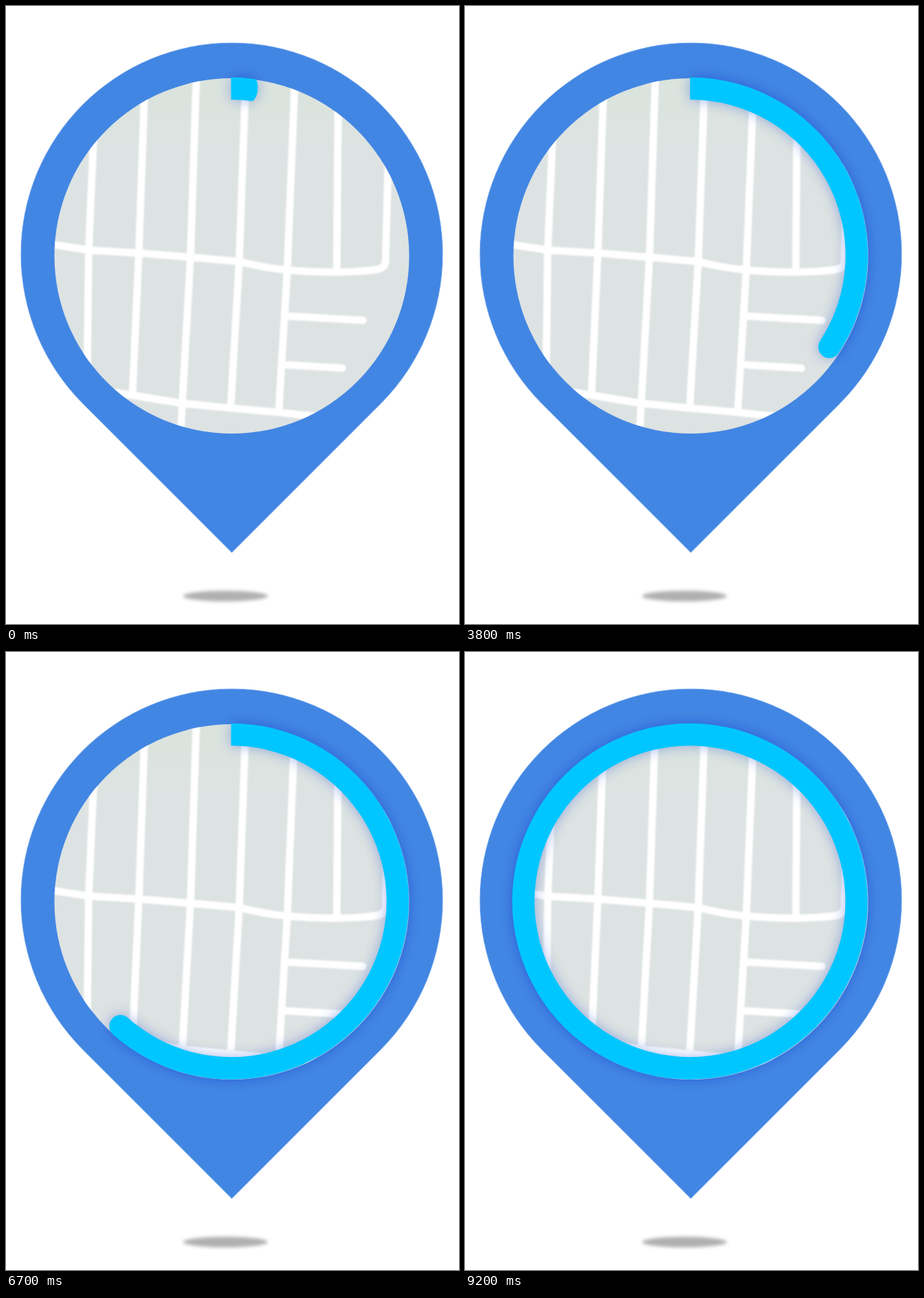
Recreate the animation shown at these times as an HTML page. Size 641 by 873 pixels, loop 9.3 s.

```html
<!DOCTYPE html>
<html lang="en">
<head>
<meta charset="utf-8">
<title>Map pin progress</title>
<style>
  html, body { margin: 0; width: 100%; height: 100%; overflow: hidden; background: #fff; }
  svg { display: block; }
  .roads { fill: none; stroke: #fff; stroke-width: 10.5; stroke-linecap: round; stroke-linejoin: round; filter: blur(.9px); }
  .glow { fill: #2450d0; filter: blur(9px); }
</style>
</head>
<body>
<svg width="641" height="873" viewBox="0 0 641 873">
  <defs>
    <clipPath id="disc"><circle cx="319.5" cy="353" r="251"/></clipPath>
    <linearGradient id="land" x2="0" y2="1">
      <stop offset="0" stop-color="#dae3dd"/>
      <stop offset=".2" stop-color="#dde3e2"/>
      <stop offset="1" stop-color="#dde2e2"/>
    </linearGradient>
    <path id="arc"/>
  </defs>

  <ellipse cx="310.5" cy="833.5" rx="60" ry="7.5" fill="#b0b0b0" style="filter:blur(2.5px)"/>
  <path d="M319.5 772 L108.6 561.4 A298.3 298.3 0 1 1 530.4 561.4 Z" fill="#4286e3" stroke="#6fa3ec" stroke-width=".8"/>
  <use href="#arc" class="glow" opacity=".75"/>

  <g clip-path="url(#disc)">
    <rect x="68" y="101" width="503" height="504" fill="url(#land)"/>
    <g class="roads">
      <path d="M124 185 L117 345 L115 510"/>
      <path d="M196 120 L188 348 L179 548"/>
      <path d="M269.500 95 L261 355 L247 605"/>
      <path d="M339.500 95 L330 361 L318 566"/>
      <path d="M408.500 110 L398 373 L386 572"/>
      <path d="M470 140 L468 374"/>
      <path d="M60 336 L118 345 L188 349 L262 355 L330 361 Q365 370 398 373 T468 376 Q510 375 526 372 Q537 369 537 361 L541 215"/>
      <path d="M398 438 L505 444 M398 507 L476 511.500"/>
      <path d="M155 546 L180 550 L247 561 L318 568 L386 574 L450 581"/>
    </g>
    <use href="#arc" class="glow" opacity=".42"/>
  </g>
  <use href="#arc" fill="#00c6ff"/>
</svg>
<script>
  const LOOP = 9300, STEP = 100;
  const CX = 318.5, CY = 352.25, OUTER = 251.5, INNER = 220;
  const HALF = (OUTER - INNER) / 2;

  // time in ms, sweep in degrees, depth of the leading cap
  const keys = [
    [0, 7.5, 7], [500, 28, 15], [600, 28, 15], [1400, 54.2, HALF], [1600, 61, HALF],
    [2400, 82.7, 6.5], [2600, 91, HALF], [3600, 121, HALF], [3800, 123.3, HALF],
    [4600, 151.3, HALF], [5600, 183, 7], [6600, 218.7, HALF], [7600, 248, HALF],
    [7800, 253.6, HALF], [8600, 289, HALF], [9200, 359.9, HALF]
  ];
  const arc = document.getElementById('arc');

  function poseAt(t) {
    const n = Math.max(1, keys.findIndex(k => k[0] >= t));
    const a = keys[n - 1], b = keys[n];
    const u = (t - a[0]) / (b[0] - a[0]);
    return [1, 2].map(i => a[i] + (b[i] - a[i]) * u);
  }

  function point(radius, deg) {
    const a = deg * Math.PI / 180;
    return (CX + radius * Math.sin(a)).toFixed(2) + ' ' + (CY - radius * Math.cos(a)).toFixed(2);
  }

  function draw(now) {
    const t = Math.floor(now % LOOP / STEP) * STEP;
    const [deg, cap] = poseAt(t);
    const large = deg > 180 ? 1 : 0;
    arc.setAttribute('d',
      `M${point(OUTER, 0)} A${OUTER} ${OUTER} 0 ${large} 1 ${point(OUTER, deg)} ` +
      `A${cap} ${HALF} ${deg} 0 1 ${point(INNER, deg)} ` +
      `A${INNER} ${INNER} 0 ${large} 0 ${point(INNER, 0)} Z`);
    requestAnimationFrame(draw);
  }
  draw(performance.now());
</script>
</body>
</html>
```
